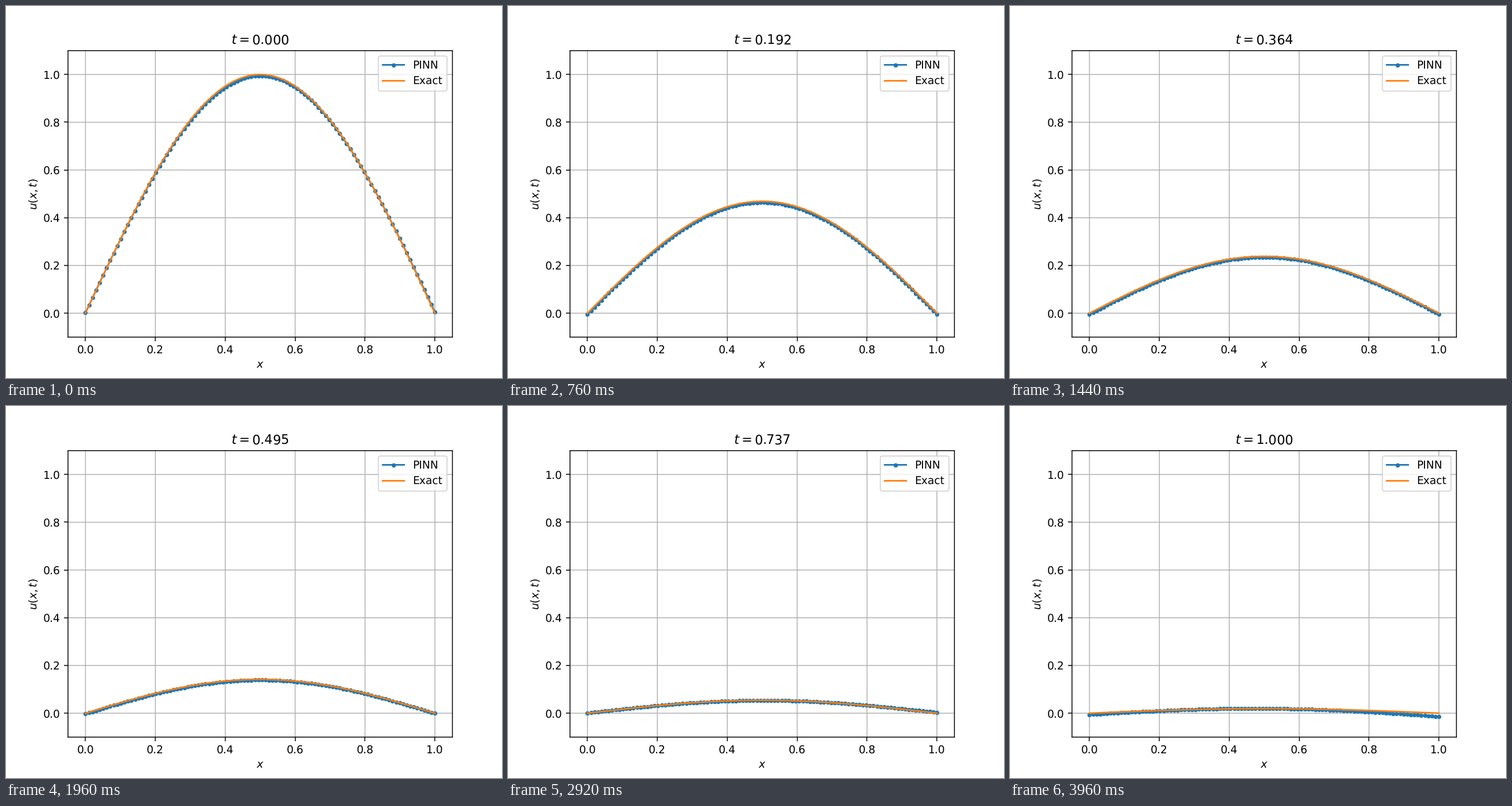
These frames come from a looping animation (864x648 px, 4000 ms). A matplotlib script:

```python
import numpy as np
import matplotlib.pyplot as plt
from matplotlib.animation import FuncAnimation

FRAMES = 100
ALPHA = 0.4  # diffusivity of the heat equation

# Soft, unsnapped edges
plt.rcParams.update({"text.hinting": "none", "path.snap": False})

x = np.linspace(0, 1, 100)


def cubic(*values):
    """Smooth drift through four values, given in thousandths."""
    return np.poly1d(np.polyfit([0, 0.25, 0.65, 1], values, 3) / 1000)


# Network error: offsets at both ends plus a bump in the middle
left = cubic(2, -5.5, 0, -6)
right = cubic(5, -6, 3, -14)
bump = cubic(-9.5, 1, -3, 10.5)


def exact(t):
    return np.exp(-ALPHA * np.pi**2 * t) * np.sin(np.pi * x)


def predicted(t):
    error = left(t) * (1 - x) + right(t) * x + bump(t) * np.sin(np.pi * x)
    return exact(t) + error


fig, ax = plt.subplots(figsize=(6.4, 4.8), dpi=135)
pinn_line, = ax.plot(x, predicted(0), ".-", label="PINN")
exact_line, = ax.plot(x, exact(0), label="Exact")
ax.set_xlim(-0.05, 1.05)
ax.set_ylim(-0.1, 1.1)
ax.set_xlabel("$x$")
ax.set_ylabel("$u(x,t)$")
title = ax.set_title("$t=0.000$")
ax.grid(True)
ax.legend(loc="upper right")


def update(i):
    t = i / (FRAMES - 1)
    pinn_line.set_ydata(predicted(t))
    exact_line.set_ydata(exact(t))
    title.set_text(f"$t={t:.3f}$")
    return pinn_line, exact_line, title


anim = FuncAnimation(fig, update, frames=FRAMES, interval=40,
                     repeat=True, repeat_delay=0)
plt.show()
```
